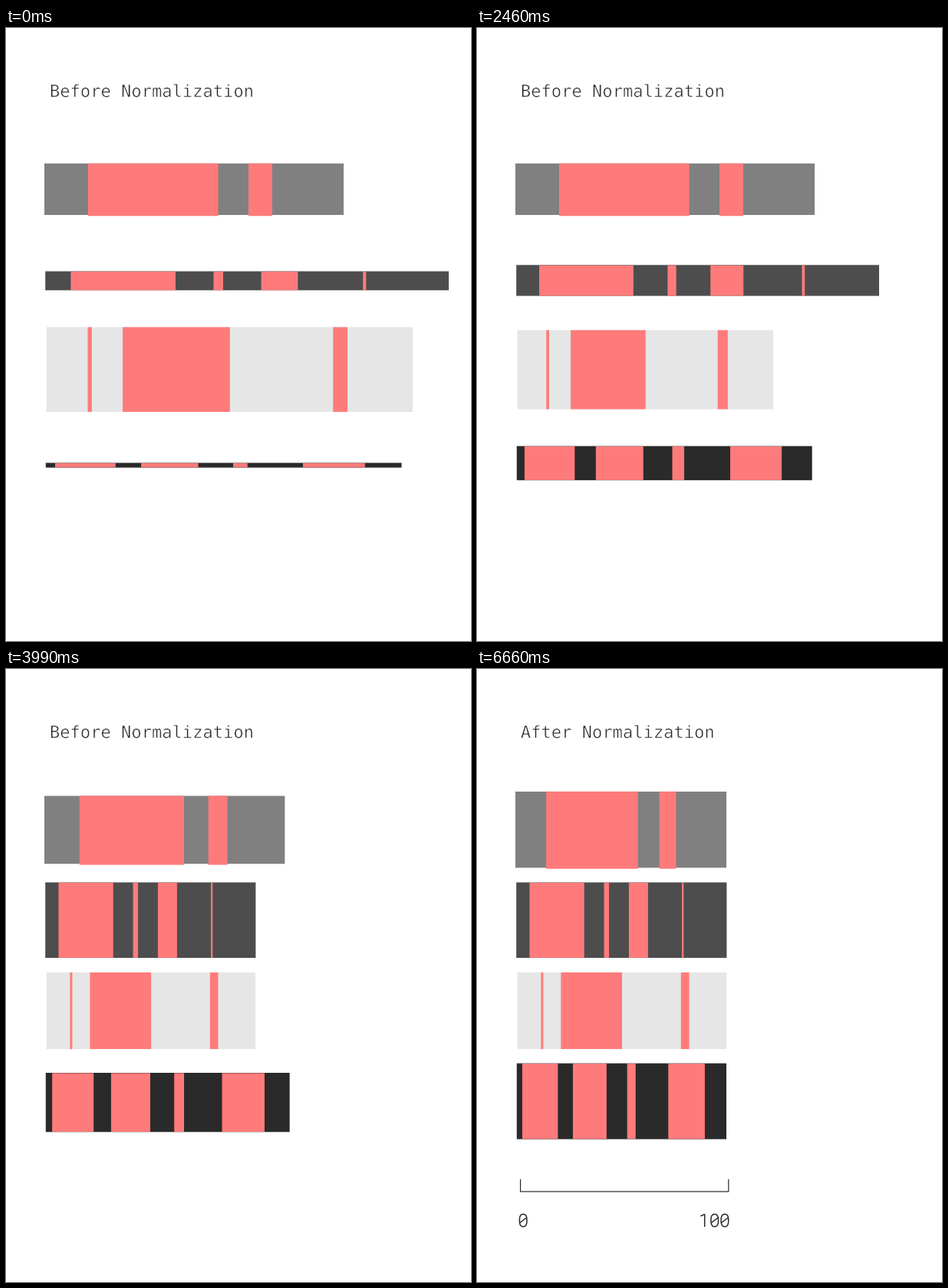
A matplotlib script for the animation above (8 s loop, 606x800 px).

```python
import numpy as np
import matplotlib.pyplot as plt
from matplotlib.animation import FuncAnimation
from matplotlib.patches import PathPatch, Rectangle
from matplotlib.textpath import TextPath
from matplotlib.transforms import Affine2D

W, H, DPI = 606, 800, 64
PX = 72 / DPI                 # one pixel in points
LOOP, TICK = 8000, 20
STEP = 30                     # the picture moves on in steps of 30 ms

INK = "#282828"
RED = "#ff7b7b"

TITLE_SWAP = 5010
AXIS_START, AXIS_END = 5310, 5790
DIGITS = [("0", 60.2, 5940), ("1", 294.6, 6360),
          ("0", 309.7, 6510), ("0", 322.9, 6660)]

# left, (right, top, bottom) before and after, start and end in ms,
# insets of the red at top and bottom, red spans in the first pose
BARS = [
    dict(color="#808080", left=50, a=(440, 176.8, 244), b=(325, 160, 259.4),
         time=(2670, 4650), inset=(-0.1, -1.3),
         spans=[(107, 276.6), (316, 347)]),
    dict(color="#4d4d4d", left=51.2, a=(577, 317.5, 342.3), b=(325.4, 278.5, 377),
         time=(2100, 3810), inset=(0.4, 0.1),
         spans=[(84.4, 221), (270.5, 283), (332.6, 380.4), (465.2, 469.3)]),
    dict(color="#e6e6e6", left=52.7, a=(530, 390.4, 501), b=(325, 396, 496),
         time=(1260, 2970), inset=(0, 0),
         spans=[(106.5, 111.8), (152, 291.8), (426.3, 445)]),
    dict(color="#2a2a2a", left=51.8, a=(515.5, 567.5, 573.7), b=(325, 514.6, 613.6),
         time=(660, 5010), inset=(0.4, 0.3),
         spans=[(64, 142.8), (176, 250.5), (296, 314.7), (387, 467.8)]),
]

fig = plt.figure(figsize=(W / DPI, H / DPI), dpi=DPI, facecolor="white")
ax = fig.add_axes([0, 0, 1, 1])
ax.set_xlim(0, W)
ax.set_ylim(H, 0)
ax.axis("off")


def add_rect(color):
    rect = Rectangle((0, 0), 1, 1, facecolor=color, linewidth=0, snap=False)
    return ax.add_patch(rect)


def add_line(xs, ys, width):
    line, = ax.plot(xs, ys, color=INK, lw=width * PX, snap=False,
                    solid_capstyle="butt", solid_joinstyle="miter")
    return line


def add_title(text):
    """Text with a thin white rim, which gives it a lighter weight."""
    path = TextPath((0, 0), text, size=22.1, prop={"family": "DejaVu Sans Mono"})
    place = Affine2D().scale(1, -1).translate(56.9, 90)
    return ax.add_patch(PathPatch(place.transform_path(path), facecolor=INK,
                                  edgecolor="white", lw=0.55 * PX, snap=False))


def add_digit(char, x):
    """Light monospaced digit: a flagged one or a slashed zero."""
    if char == "1":
        return [add_line([x - 3.3, x + 2.1, x + 2.1], [714, 711.6, 728], 1.5)]
    turn = np.linspace(0, 2 * np.pi, 80)
    c, s = np.cos(turn), np.sin(turn)
    xs = x + 4.8 * np.sign(c) * np.abs(c) ** 0.8
    ys = 719.6 + 8.1 * np.sign(s) * np.abs(s) ** 0.8
    return [add_line(xs, ys, 1.5),
            add_line([x - 4.2, x + 4.2], [722.6, 716.2], 1.4)]


def place(rect, left, right, top, bottom):
    rect.set_bounds(left, top, right - left, bottom - top)


def progress(t, start, end):
    return min(max((t - start) / (end - start), 0), 1)


for bar in BARS:
    bar["base"] = add_rect(bar["color"])
    bar["reds"] = [add_rect(RED) for _ in bar["spans"]]

before = add_title("Before Normalization")
after = add_title("After Normalization")
axis_x = np.array([56.6, 56.6, 327.8, 327.8])
axis_y = np.array([665.8, 682, 682, 665.8])
axis_len = np.concatenate([[0], np.cumsum(np.hypot(np.diff(axis_x), np.diff(axis_y)))])
axis_line = add_line([], [], 1.2)
digits = [(add_digit(char, x), start) for char, x, start in DIGITS]


def move_bar(bar, t):
    p = progress(t, *bar["time"])
    right, top, bottom = (u + (v - u) * p for u, v in zip(bar["a"], bar["b"]))
    left = bar["left"]
    scale = (right - left) / (bar["a"][0] - left)
    place(bar["base"], left, right, top, bottom)
    for rect, (x0, x1) in zip(bar["reds"], bar["spans"]):
        place(rect, left + (x0 - left) * scale, left + (x1 - left) * scale,
              top + bar["inset"][0], bottom - bar["inset"][1])


def draw_axis(t):
    p = progress(t, AXIS_START, AXIS_END)
    axis_line.set_visible(p > 0)
    drawn = p * axis_len[-1]
    stops = np.append(axis_len[axis_len < drawn], drawn)
    axis_line.set_data(np.interp(stops, axis_len, axis_x),
                       np.interp(stops, axis_len, axis_y))


def update(i):
    t = (i * TICK + STEP // 2) // STEP * STEP
    for bar in BARS:
        move_bar(bar, t)
    before.set_visible(t < TITLE_SWAP)
    after.set_visible(t >= TITLE_SWAP)
    draw_axis(t)
    for lines, start in digits:
        for line in lines:
            line.set_visible(t >= start)
    return []


anim = FuncAnimation(fig, update, frames=LOOP // TICK, interval=TICK,
                     init_func=lambda: update(0), repeat=True, repeat_delay=0)
plt.show()
```
